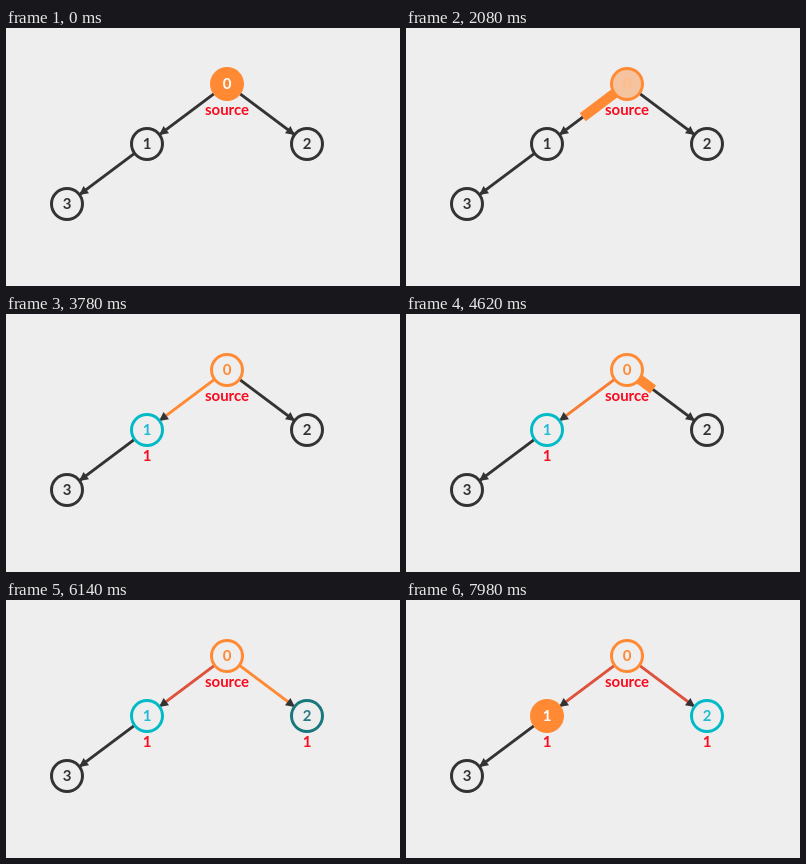
These frames come from a looping animation (394 px wide and 258 px high, 8 s). An HTML page with a canvas:

```html
<!DOCTYPE html>
<html lang="en">
<head>
<meta charset="utf-8">
<title>Breadth-first search</title>
<style>
html, body { margin: 0; width: 100%; height: 100%; overflow: hidden; background: #eee; }
canvas { display: block; width: 394px; height: 258px; }
</style>
</head>
<body>
<canvas id="stage"></canvas>
<script>
const W = 394, H = 258, LOOP = 8000, MOVE = 1120, SHRINK = 180;
const BG = [238, 238, 238], DARK = [51, 51, 51], WHITE = [255, 255, 255];
const ORANGE = [255, 138, 51], BLUE = [0, 186, 200], SKY = [35, 187, 208], RED = [222, 81, 61];
const LABEL = '#f90a1c';
// start time of each step of the search
const WALK1 = 1490, SEE1 = 2780, WALK2 = 4180, SEE2 = 5580, VISIT1 = 6820;

const nodes = [[221, 56], [141, 116], [301, 116], [61, 176]];

const canvas = document.getElementById('stage');
const dpr = window.devicePixelRatio || 1;
canvas.width = W * dpr;
canvas.height = H * dpr;
const ctx = canvas.getContext('2d');
ctx.scale(dpr, dpr);

const clamp = x => Math.max(0, Math.min(1, x));
const ease = x => x < 0.5 ? 4 * x ** 3 : 1 - 4 * (1 - x) ** 3;
const step = (t, start) => ease(clamp((t - start) / MOVE));
const mix = (a, b, k) => a.map((v, i) => v + (b[i] - v) * k);
const css = c => `rgb(${c.map(Math.round).join(',')})`;

function line(x1, y1, x2, y2, width, color) {
  ctx.lineWidth = width;
  ctx.strokeStyle = css(color);
  ctx.beginPath();
  ctx.moveTo(x1, y1);
  ctx.lineTo(x2, y2);
  ctx.stroke();
}

function disc(x, y, r, color) {
  ctx.fillStyle = css(color);
  ctx.beginPath();
  ctx.arc(x, y, r, 0, Math.PI * 2);
  ctx.fill();
}

function text(str, x, y, color) {
  ctx.fillStyle = color;
  ctx.fillText(str, x, y);
}

function arrow(x, y, angle) {
  ctx.save();
  ctx.translate(x, y);
  ctx.rotate(angle);
  ctx.fillStyle = css(DARK);
  ctx.beginPath();
  ctx.moveTo(-8.1, -4.5);
  ctx.lineTo(0.9, 0);
  ctx.lineTo(-8.1, 4.5);
  ctx.fill();
  ctx.restore();
}

function edge(from, to, t, start, color) {
  const [ax, ay] = nodes[from], [bx, by] = nodes[to];
  const angle = Math.atan2(by - ay, bx - ax);
  const dx = 16 * Math.cos(angle), dy = 16 * Math.sin(angle);
  const x1 = ax + dx, y1 = ay + dy, x2 = bx - dx, y2 = by - dy;
  const grow = step(t, start);
  if (grow < 1) {
    line(x1, y1, x2, y2, 3, DARK);
    arrow(x2, y2, angle);
    if (grow > 0) line(x1, y1, x1 + (x2 - x1) * grow, y1 + (y2 - y1) * grow, 10, ORANGE);
  } else {
    const thin = ease(clamp((t - start - MOVE) / SHRINK));
    line(x1, y1, x2, y2, 10 - 7 * thin, color);
    arrow(x2, y2, angle);
  }
}

function node(id, ring, fill, ink) {
  const [x, y] = nodes[id];
  disc(x, y, 17, ring);
  disc(x, y, 14, fill);
  text(String(id), x, y + 5, css(ink));
}

function label(str, id) {
  const [x, y] = nodes[id];
  text(str, x, y + 31, LABEL);
}

function draw(t) {
  ctx.fillStyle = css(BG);
  ctx.fillRect(0, 0, W, H);
  ctx.font = 'bold 15px Lato, "Open Sans", sans-serif';
  ctx.textAlign = 'center';
  ctx.textBaseline = 'alphabetic';

  const leave = step(t, WALK1), see1 = step(t, SEE1), see2 = step(t, SEE2);
  const visit = step(t, VISIT1);

  edge(0, 1, t, WALK1, mix(ORANGE, RED, step(t, WALK2)));
  edge(0, 2, t, WALK2, mix(ORANGE, RED, visit));
  edge(1, 3, t, LOOP, DARK);

  node(0, ORANGE, mix(ORANGE, BG, leave), mix(WHITE, ORANGE, leave));
  node(1, mix(mix(DARK, BLUE, see1), ORANGE, visit), mix(BG, ORANGE, visit),
    mix(mix(DARK, SKY, see1), WHITE, visit));
  node(2, mix(DARK, BLUE, see2), BG, mix(DARK, SKY, see2));
  node(3, DARK, BG, DARK);

  label('source', 0);
  if (t >= SEE1) label('1', 1);
  if (t >= SEE2) label('1', 2);
}

const began = performance.now();
function frame() {
  draw((performance.now() - began) % LOOP);
  requestAnimationFrame(frame);
}
frame();
</script>
</body>
</html>
```
